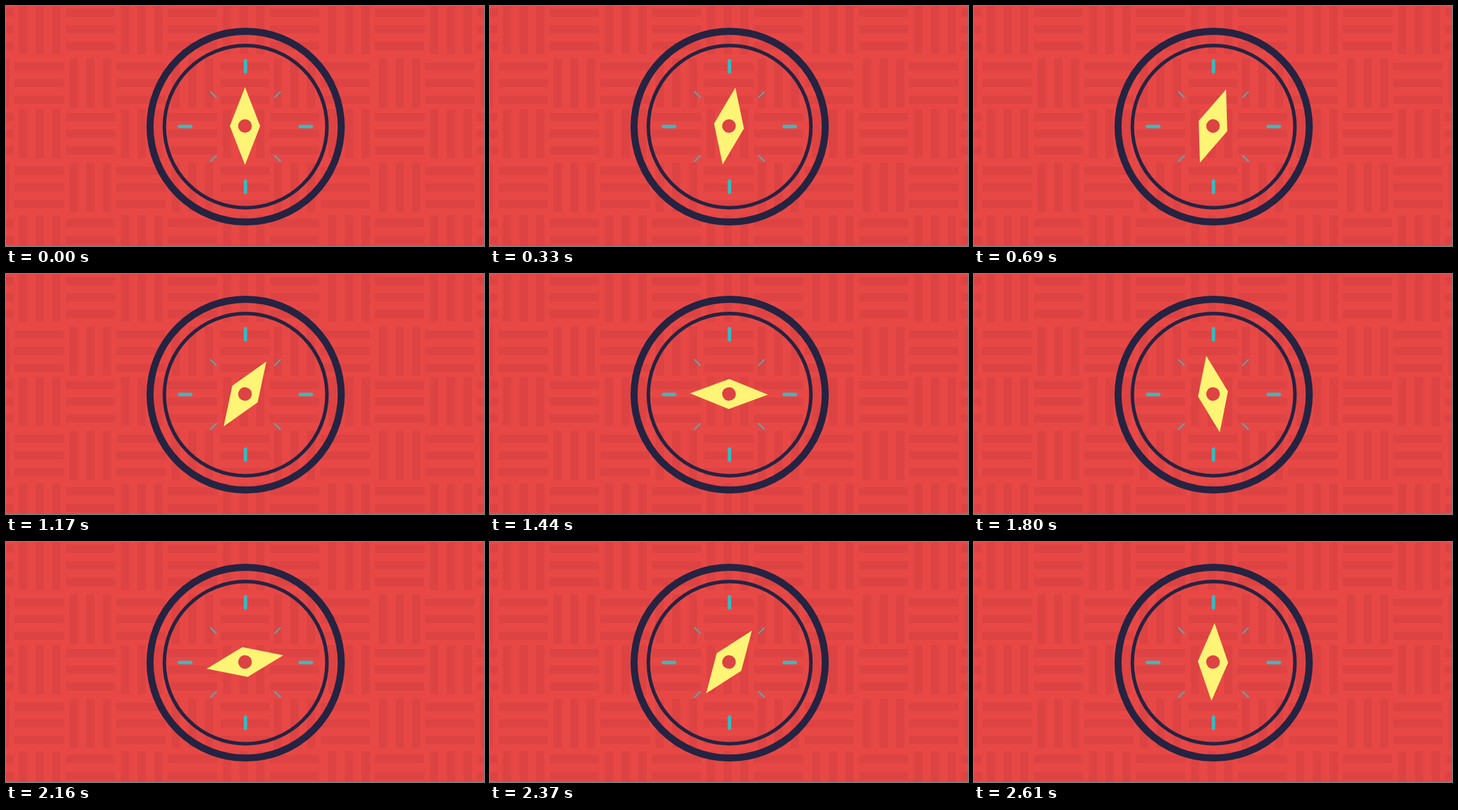
An HTML page with a canvas that plays this animation: 745x375 px, repeating every 2.64 s.

```html
<!DOCTYPE html>
<html lang="en">
<head>
<meta charset="utf-8">
<title>Compass</title>
<style>
  html, body { margin: 0; width: 100%; height: 100%; overflow: hidden; background: #e74846; }
  canvas { display: block; }
</style>
</head>
<body>
<canvas id="stage" width="745" height="375"></canvas>
<script>
const ctx = document.getElementById('stage').getContext('2d');
const LOOP = 2640, STEP = 30;
const RED = '#e74846', STRIPE = '#dd4342', NAVY = '#252342', TEAL = '#3bb8be', YELLOW = '#fff475';
const TAU = Math.PI * 2;

// Spin back after the slow wind-up: time, degrees, degrees per ms.
const WIND_RATE = 0.0284;
const SPIN = [
  [1200, 34.1, -0.85],
  [1440, -89, -0.33],
  [1800, -190, -0.26],
  [2160, -280, -0.23],
  [2610, -357.7, -0.09],
  [2640, -360, -0.06]
];

function needleAngle(t) {
  if (t <= SPIN[0][0]) return t * WIND_RATE;
  const i = SPIN.findIndex(key => key[0] >= t);
  const [t0, a0, v0] = SPIN[i - 1], [t1, a1, v1] = SPIN[i];
  const d = t1 - t0, u = (t - t0) / d, w = 1 - u;
  return w * w * ((1 + 2 * u) * a0 + u * d * v0) + u * u * ((1 + 2 * w) * a1 - w * d * v1);
}

// Basket weave: blocks of three bars, upright and flat in turn.
const BLOCK = 77, BAR = 13, PITCH = 26;
const ROWS = [-2, 82, 161, 245, 327];
const WEAVES = [
  { upright: [20, 179, 338, 502, 661], flat: [-65, 93, 252, 411, 575, 734] },
  { upright: [-60, 99, 258, 417, 581, 740], flat: [13, 172, 334, 490, 653] }
];

function drawWeave() {
  ctx.fillStyle = RED;
  ctx.fillRect(0, 0, 745, 375);
  ctx.fillStyle = STRIPE;
  ROWS.forEach((y, row) => {
    const { upright, flat } = WEAVES[row % 2];
    for (let bar = 0; bar < 3; bar++) {
      const shift = bar * PITCH;
      upright.forEach(x => ctx.fillRect(x + shift, y, BAR, BLOCK));
      flat.forEach(x => ctx.fillRect(x, y + 6 + shift, BLOCK, BAR));
    }
  });
}

function ring(radius, width) {
  ctx.lineWidth = width;
  ctx.beginPath();
  ctx.arc(0, 0, radius, 0, TAU);
  ctx.stroke();
}

function drawDial() {
  ctx.save();
  ctx.translate(373.5, 188.5);
  ctx.strokeStyle = NAVY;
  ring(149, 11);
  ring(126.7, 5.5);
  ctx.translate(-0.3, -0.2);
  ctx.strokeStyle = TEAL;
  ctx.lineCap = 'round';
  for (let i = 0; i < 8; i++) {
    const major = i % 2 === 0;
    ctx.lineWidth = major ? 5.5 : 2;
    ctx.beginPath();
    ctx.moveTo(0, major ? -85.3 : -64.3);
    ctx.lineTo(0, major ? -102.7 : -76.7);
    ctx.stroke();
    ctx.rotate(TAU / 8);
  }
  ctx.restore();
}

function drawNeedle(degrees) {
  ctx.save();
  ctx.translate(372.5, 187.5);
  ctx.rotate(degrees * Math.PI / 180);
  ctx.fillStyle = YELLOW;
  ctx.beginPath();
  ctx.moveTo(0, -60.7);
  ctx.lineTo(23.6, 0);
  ctx.lineTo(0, 60.7);
  ctx.lineTo(-23.6, 0);
  ctx.fill();
  ctx.fillStyle = STRIPE;
  ctx.beginPath();
  ctx.arc(0, 0, 10.6, 0, TAU);
  ctx.fill();
  ctx.restore();
}

let start = null;
function frame(now) {
  if (start === null) start = now;
  const t = Math.floor(((now - start) % LOOP) / STEP + 0.001) * STEP;
  drawWeave();
  drawDial();
  drawNeedle(needleAngle(t));
  requestAnimationFrame(frame);
}
requestAnimationFrame(frame);
</script>
</body>
</html>
```
